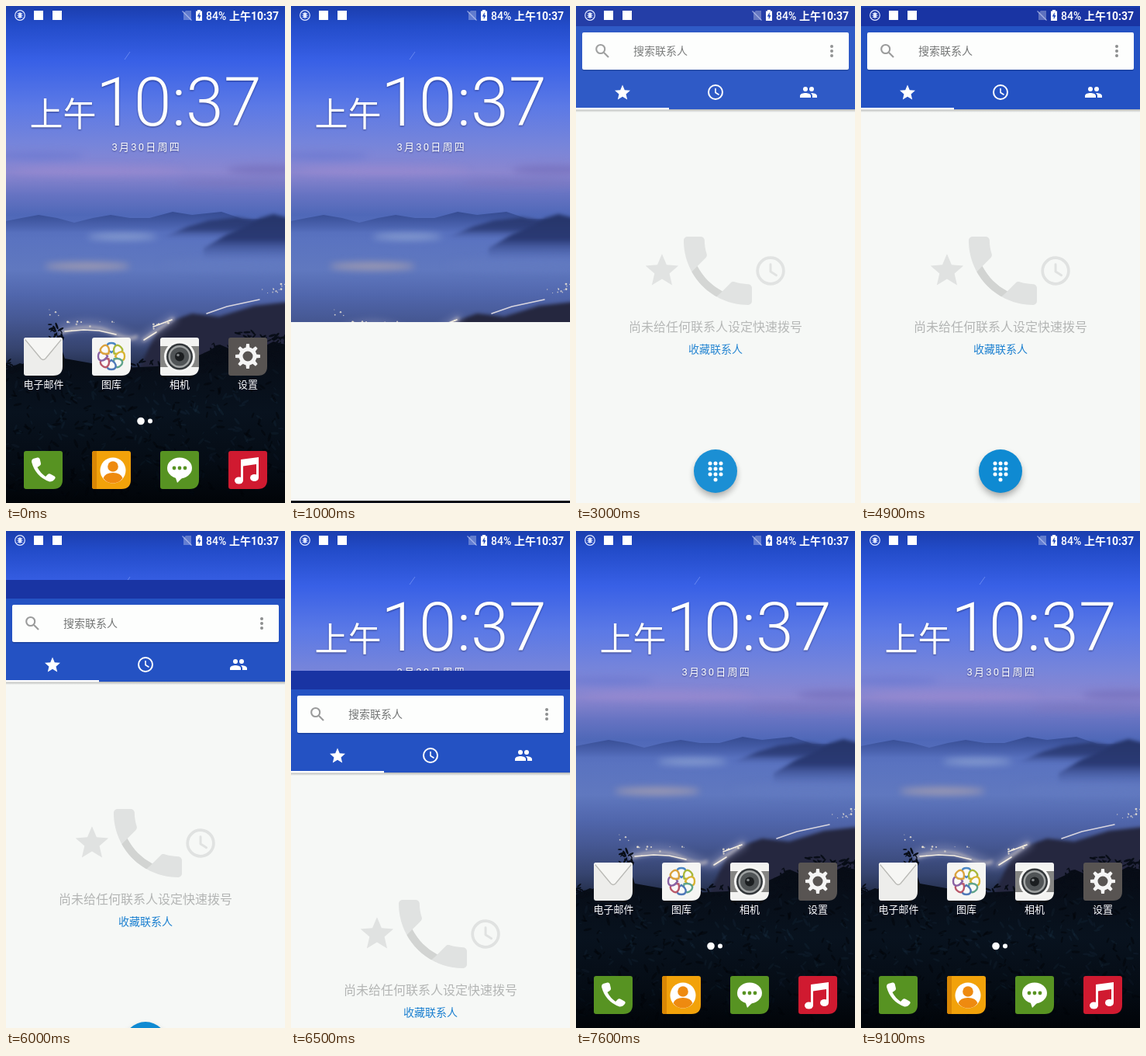
Recreate the animation shown at these times as an HTML page. Size 360 by 640 pixels, loop 9.2 s.

```html
<!DOCTYPE html>
<html lang="zh-CN">
<head>
<meta charset="utf-8">
<title>Phone launcher</title>
<style>
html, body { margin: 0; width: 100%; height: 100%; overflow: hidden; background: #050a12; }
svg { display: block; width: 360px; height: 640px; }
text { font-family: Roboto, "Noto Sans CJK SC", "Noto Sans CJK", sans-serif; }
.label { font-size: 13px; font-weight: 500; fill: #fff; text-anchor: middle; }
.shade { filter: drop-shadow(0 1px 1px rgba(0,0,40,.45)); }
.soft { filter: blur(5px); }
.haze { filter: blur(2px); }
.mid { text-anchor: middle; }
.line { fill: none; stroke-linecap: round; stroke-linejoin: round; }
</style>
</head>
<body>
<svg viewBox="0 0 360 640">
  <defs>
    <linearGradient id="sky" x2="0" y2="1">
      <stop offset="0" stop-color="#1b3eae"/>
      <stop offset=".04" stop-color="#234cca"/>
      <stop offset=".11" stop-color="#3860e6"/>
      <stop offset=".2" stop-color="#5b79e6"/>
      <stop offset=".28" stop-color="#7785da"/>
      <stop offset=".335" stop-color="#8b86cf"/>
      <stop offset=".38" stop-color="#6673c2"/>
      <stop offset=".42" stop-color="#4f68b8"/>
      <stop offset=".47" stop-color="#5a73c0"/>
      <stop offset=".53" stop-color="#6078bf"/>
      <stop offset=".58" stop-color="#5167ad"/>
      <stop offset=".63" stop-color="#465894"/>
      <stop offset=".69" stop-color="#36446f"/>
      <stop offset=".75" stop-color="#1a2338"/>
      <stop offset="1" stop-color="#03070d"/>
    </linearGradient>
    <linearGradient id="ground" x2="0" y2="1">
      <stop offset="0" stop-color="#070b14"/>
      <stop offset=".45" stop-color="#08121e"/>
      <stop offset=".75" stop-color="#050c15"/>
      <stop offset="1" stop-color="#010408"/>
    </linearGradient>
    <linearGradient id="far" x2="0" y2="1">
      <stop offset="0" stop-color="#364c92"/>
      <stop offset="1" stop-color="#364c92" stop-opacity="0"/>
    </linearGradient>
    <linearGradient id="near" x2="0" y2="1">
      <stop offset="0" stop-color="#263569"/>
      <stop offset=".55" stop-color="#2a3a74"/>
      <stop offset="1" stop-color="#4a60a8" stop-opacity="0"/>
    </linearGradient>
    <linearGradient id="drop" x2="0" y2="1">
      <stop offset="0" stop-color="#000" stop-opacity=".28"/>
      <stop offset="1" stop-color="#000" stop-opacity="0"/>
    </linearGradient>
    <path id="tile" d="M3 0H47Q50 0 50 3V37Q50 49 38 49H3Q0 49 0 46V3Q0 0 3 0Z"/>
    <path id="star" d="M12 17.27 18.18 21l-1.64-7.03L22 9.24l-7.19-.61L12 2 9.19 8.63 2 9.24l5.46 4.73L5.82 21z"/>
    <path id="phone" d="M6.62 10.79c1.44 2.83 3.76 5.14 6.59 6.59l2.2-2.2c.27-.27.67-.36 1.02-.24 1.12.37 2.33.57 3.57.57.55 0 1 .45 1 1V20c0 .55-.45 1-1 1-9.39 0-17-7.61-17-17 0-.55.45-1 1-1h3.5c.55 0 1 .45 1 1 0 1.25.2 2.45.57 3.57.11.35.03.74-.25 1.02z"/>
    <clipPath id="phoneClip"><use href="#phone"/></clipPath>
    <g id="clock" class="line" stroke-width="2"><circle cx="12" cy="12" r="9"/><path d="M12 7.5V12.5L16 15" stroke-width="1.6"/></g>
  </defs>

  <g id="wallpaper">
    <rect width="360" height="640" fill="url(#sky)"/>
    <g class="soft">
      <ellipse cx="40" cy="193" rx="60" ry="5" fill="#6676cf" opacity=".6"/>
      <ellipse cx="120" cy="212" rx="110" ry="6" fill="#a18dd0" opacity=".45"/>
      <ellipse cx="335" cy="211" rx="50" ry="6" fill="#6f69b8" opacity=".6"/>
      <ellipse cx="300" cy="228" rx="80" ry="4" fill="#7d72ba" opacity=".5"/>
    </g>
    <path d="M153 69 160 59" stroke="#9db4ff" stroke-width=".7" opacity=".7"/>
    <path d="M0 277 20 273 42 269 66 273 88 279 112 273 135 269 160 273 185 273 215 265 240 269 278 265 305 274 360 275V292H0Z" fill="url(#far)"/>
    <g class="soft">
      <ellipse cx="150" cy="297" rx="45" ry="4" fill="#9cb0d8" opacity=".75"/>
      <ellipse cx="105" cy="335" rx="55" ry="5" fill="#b3a6ac" opacity=".75"/>
      <ellipse cx="300" cy="333" rx="100" ry="9" fill="#657cc2" opacity=".5"/>
    </g>
    <path class="haze" d="M206 296 235 284 262 276 298 272 330 277 345 300H206Z" fill="url(#near)" opacity=".85"/>
    <path class="haze" d="M255 312 285 294 312 282 328 273 345 268 365 273V326H255Z" fill="url(#near)"/>
    <path class="haze" d="M170 470 195 418 215 405 240 396 275 400 320 386 365 381V480H170Z" fill="#25273f"/>
    <g class="line">
      <path class="soft" d="M72 416Q110 404 140 418T178 428L215 403" stroke="#8b93bd" stroke-width="12" opacity=".5"/>
      <path class="haze" d="M72 420Q110 408 135 420T168 426M178 430 215 403" stroke="#d9cfca" stroke-width="4" opacity=".7"/>
      <path d="M76 419 100 417 120 418 142 423M178 430 194 420M190 413 214 404" stroke="#f5eee2" stroke-width="1.6"/>
      <path d="M259 396 285 387 327 378" stroke="#d9d6df" stroke-width="1.5"/>
    </g>
    <g id="lights" fill="#fff3da"></g>
    <path d="M0 468 18 460 32 464 52 456 61 428 67 428 76 454 110 460 150 466 195 464 235 456 262 444 276 436 290 442 300 428 316 434 330 440 345 432 360 436V640H0Z" fill="url(#ground)"/>
    <g id="leaves"></g>
  </g>

  <g fill="#fff">
    <g class="shade">
      <text x="30.5" y="154.5" font-size="43" font-weight="300">上午</text>
      <text x="116" y="154.3" font-size="88" font-weight="300">10:37</text>
      <text class="mid" x="181.2" y="186" font-size="13" letter-spacing="2.2">3月30日周四</text>
    </g>
    <circle cx="174" cy="534.5" r="4.8"/><circle cx="186" cy="534.5" r="3"/>
    <g transform="translate(23 427)">
      <use href="#tile" fill="#ededeb"/>
      <path d="M0 3Q0 0 3 0H47Q50 0 50 3L28 27Q25 30 22 27Z" fill="#f6f6f4"/>
      <path class="line" d="M2 3 22 27Q25 30 28 27L48 3" stroke="#b9b9b5" stroke-width="1.3"/>
    </g>
    <g transform="translate(111 427)">
      <use href="#tile" fill="#f5f5f3"/>
      <g id="petals" transform="translate(25 24)"></g>
    </g>
    <g transform="translate(199 427)">
      <use href="#tile" fill="#f3f3f1"/>
      <path d="M0 11H50V38H0Z" fill="#858583"/>
      <g transform="translate(25 24.5)">
        <circle r="20" fill="#f7f7f5"/>
        <circle r="17" fill="#33373a"/>
        <circle r="14.5" fill="#a0a3a3"/>
        <circle r="12" fill="#505456"/>
        <circle r="6" fill="#1b1e20"/>
        <circle cx="-2" cy="-2" r="1.8" fill="#808587"/>
      </g>
    </g>
    <g transform="translate(287 427)">
      <use href="#tile" fill="#585452"/>
      <g id="gear" transform="translate(25 24)"><circle r="9" fill="none" stroke="#f5f5f5" stroke-width="5"/></g>
    </g>
    <g transform="translate(23 573)">
      <use href="#tile" fill="#579322"/>
      <path d="M12 10 17.5 8.500Q20 8 20.700 10.500L22 16Q22.300 18 20.500 19L17.500 21Q21 28 28 33L31 30Q32.500 28.800 34.500 29.700L39.500 32.500Q41.500 34 40 36 37 40 33 39.500 15 33 10 14 9.800 11 12 10Z"/>
    </g>
    <g transform="translate(111 573)">
      <use href="#tile" fill="#f2a20a"/>
      <path d="M3 0H6V49H3Q0 49 0 46V3Q0 0 3 0Z" fill="#d98704"/>
      <circle cx="27" cy="25" r="16.5"/>
      <circle cx="27" cy="20" r="6.8" fill="#ee8a10"/>
      <path d="M14.5 35Q17 28 27 28T39.5 35Q35 41.5 27 41.5T14.5 35Z" fill="#ee8a10"/>
    </g>
    <g transform="translate(199 573)">
      <use href="#tile" fill="#579322"/>
      <ellipse cx="25" cy="22" rx="16" ry="13.5"/><path d="M19 32H31L22 41Z"/>
      <g fill="#579322"><circle cx="18" cy="22" r="2.4"/><circle cx="25" cy="22" r="2.4"/><circle cx="32" cy="22" r="2.4"/></g>
    </g>
    <g transform="translate(287 573)">
      <use href="#tile" fill="#d01a30"/>
      <path d="M16 11 39 8V34H36V17L19 19.500V38H16Z"/>
      <ellipse cx="13.500" cy="38" rx="5.500" ry="4.500"/><ellipse cx="33.500" cy="34.500" rx="5.500" ry="4.500"/>
    </g>
    <g class="shade">
      <text class="label" x="48.5" y="491.5">电子邮件</text>
      <text class="label" x="136" y="491.5">图库</text>
      <text class="label" x="224" y="491.5">相机</text>
      <text class="label" x="312" y="491.5">设置</text>
    </g>
  </g>

  <g id="sheet">
    <rect y="2" width="360" height="640" fill="#f6f8f6"/>
    <g id="content">
      <rect y="2" width="360" height="24" fill="#1934a3"/>
      <rect y="26" width="360" height="107" fill="#2452c3"/>
      <rect y="133" width="360" height="4" fill="url(#drop)"/>
      <rect y="131" width="120" height="2.5" fill="#fff"/>
      <rect x="8" y="35" width="344" height="48.5" rx="2" fill="#12307c" opacity=".5"/>
      <rect x="8" y="34" width="344" height="48" rx="2" fill="#fdfefd"/>
      <g class="line" stroke="#9a9b9b" stroke-width="2.1"><circle cx="31.7" cy="55.5" r="5.5"/><path d="M36 60 42 66" stroke-linecap="butt"/></g>
      <text x="74" y="63" font-size="14" fill="#737575">搜索联系人</text>
      <g fill="#8d8f8f"><circle cx="330" cy="52" r="2"/><circle cx="330" cy="58" r="2"/><circle cx="330" cy="64" r="2"/></g>
      <g fill="#fff">
        <use href="#star" transform="translate(48 99.5)"/>
        <use href="#clock" transform="translate(168 99)" stroke="#fff"/>
        <g transform="translate(288 99)">
          <circle cx="8" cy="8" r="3"/><path d="M1 19V16.5C1 14 5.5 13 8 13S15 14 15 16.5V19Z"/>
          <circle cx="16" cy="8" r="3"/><path d="M15 13C18 13 23 14 23 16.5V19H17V16.5Q17 14.5 15 13Z"/>
        </g>
      </g>
      <g fill="#e0e2e1">
        <use href="#star" transform="translate(85.5 315) scale(2.12)"/>
        <g transform="translate(124.3 282.3) scale(4.89)">
          <use href="#phone"/>
          <path d="M6.6 10.8 4.5 12.9 10.7 19.7 13.2 17.4Q9 15 6.6 10.8Z" fill="#d2d4d2" clip-path="url(#phoneClip)"/>
        </g>
        <use href="#clock" transform="translate(228.6 318.6) scale(1.87)" stroke="#e0e2e1"/>
      </g>
      <text class="mid" x="180" y="419" font-size="16" fill="#b3b5b4">尚未给任何联系人设定快速拨号</text>
      <text class="mid" x="180" y="446.5" font-size="14" fill="#1a7fd0">收藏联系人</text>
      <circle class="soft" cx="180" cy="604" r="27" opacity=".35"/>
      <circle cx="180" cy="599" r="28" fill="#0f8ad2"/>
      <g id="keys" fill="#fff"></g>
    </g>
  </g>
  <rect id="edge" y="637" width="360" height="3" fill="#050a16"/>

  <g fill="#fff">
    <g class="line" stroke="#dfe6ff">
      <circle cx="18" cy="12" r="6.3" stroke-width="1.2"/>
      <path d="M15 9.5H21M14.5 12H21.5M15 14.5H21" stroke-width=".8"/>
    </g>
    <ellipse cx="18" cy="12" rx="2.2" ry="3.8" fill="#dfe6ff"/>
    <rect x="36" y="6" width="12" height="12"/><rect x="60" y="6" width="12" height="12"/>
    <path d="M232 6H239V18H229V9Z" fill-opacity=".3"/>
    <path d="M227.5 6.5 239.5 18.5" stroke="#c3cdf4" stroke-opacity=".7" stroke-width="1.2"/>
    <path d="M247 5H251V6.5H253V19H245V6.5H247Z"/>
    <path d="M249.8 8 246.7 13.5H248.7V17.5L251.5 12H249.7Z" fill="#2148b8"/>
    <g font-size="14" font-weight="500">
      <text x="258" y="17.5">84%</text>
      <text x="352" y="17.5" text-anchor="end" font-weight="700">上午10:37</text>
    </g>
  </g>
</svg>
<script>
const $ = id => document.getElementById(id);

function add(parent, tag, attrs) {
  const el = document.createElementNS('http://www.w3.org/2000/svg', tag);
  for (const k in attrs) el.setAttribute(k, attrs[k]);
  parent.appendChild(el);
}

let seed = 7;
const rnd = (a, b) => {
  seed = (seed * 16807) % 2147483647;
  return a + (b - a) * seed / 2147483647;
};

function leaf(x, y, size, fill) {
  add($('leaves'), 'ellipse', {
    rx: size, ry: size * .3, fill,
    transform: `translate(${x} ${y}) rotate(${rnd(-80, 80)})`
  });
}

// Undergrowth, then the shrubs that rise above it
for (let i = 0; i < 520; i++) {
  const y = rnd(470, 630), glow = Math.max(0, 1 - Math.abs(y - 525) / 100);
  leaf(rnd(0, 360), y, rnd(2, 6), i % 2 ? `rgba(40,72,98,${.03 + glow * .14})` : 'rgba(1,4,8,.5)');
}
for (const [cx, cy, w, h, n] of [[64, 432, 9, 22, 28], [30, 464, 30, 8, 40], [275, 448, 22, 14, 45], [305, 434, 16, 14, 30], [345, 442, 16, 18, 40], [190, 464, 70, 7, 60]])
  for (let i = 0; i < n; i++) leaf(cx + rnd(-w, w), cy + rnd(-h, h), rnd(2, 5), '#080d17');

for (const [cx, cy, w, h, n] of [[110, 413, 35, 7, 10], [200, 408, 16, 8, 7], [345, 364, 16, 6, 12], [348, 453, 11, 4, 9], [62, 395, 10, 4, 4]])
  for (let i = 0; i < n; i++)
    add($('lights'), 'circle', { cx: cx + rnd(-w, w), cy: cy + rnd(-h, h), r: rnd(.5, 1.5), opacity: rnd(.5, 1) });

['#4a86c4', '#a9b83a', '#d8b432', '#5fa38a', '#4f78b8', '#b9586a', '#8a63a4', '#dba23c'].forEach((stroke, i) =>
  add($('petals'), 'path', {
    d: 'M0 -5C-8 -10 -7 -17 0 -17S8 -10 0 -5Z', fill: '#fafaf8',
    stroke, 'stroke-width': 2.4, transform: `rotate(${i * 45})`
  }));

for (let i = 0; i < 8; i++)
  add($('gear'), 'path', { d: 'M-2.6 -10.5 -1.9 -16H1.9L2.6 -10.5Z', fill: '#f5f5f5', transform: `rotate(${i * 45})` });

for (let i = 0; i < 10; i++)
  add($('keys'), 'circle', { cx: i < 9 ? 173 + i % 3 * 7 : 180, cy: 589 + Math.floor(i / 3) * 7, r: 2.5 });

const LOOP = 9200, STEP = 100, TRAVEL = 638, SLIDE = 2278;
const OPEN = 537, FADE = 2300, CLOSE = 5296;
const unit = (t, start, span) => Math.min(1, Math.max(0, (t - start) / span));

function draw(now) {
  const t = Math.floor(now % LOOP / STEP) * STEP;
  const away = t < CLOSE
    ? (1 - unit(t, OPEN, SLIDE)) ** 2
    : unit(t, CLOSE, SLIDE) ** 2;
  $('sheet').setAttribute('transform', `translate(0 ${Math.round(TRAVEL * away)})`);
  $('sheet').style.display = away < 1 ? '' : 'none';
  $('content').style.opacity = 1 - (1 - unit(t, FADE, 900)) ** 2;
  $('edge').style.display = t > OPEN && t < FADE ? '' : 'none';
}

const start = performance.now();
function tick() {
  draw(performance.now() - start);
  requestAnimationFrame(tick);
}
tick();
</script>
</body>
</html>
```
